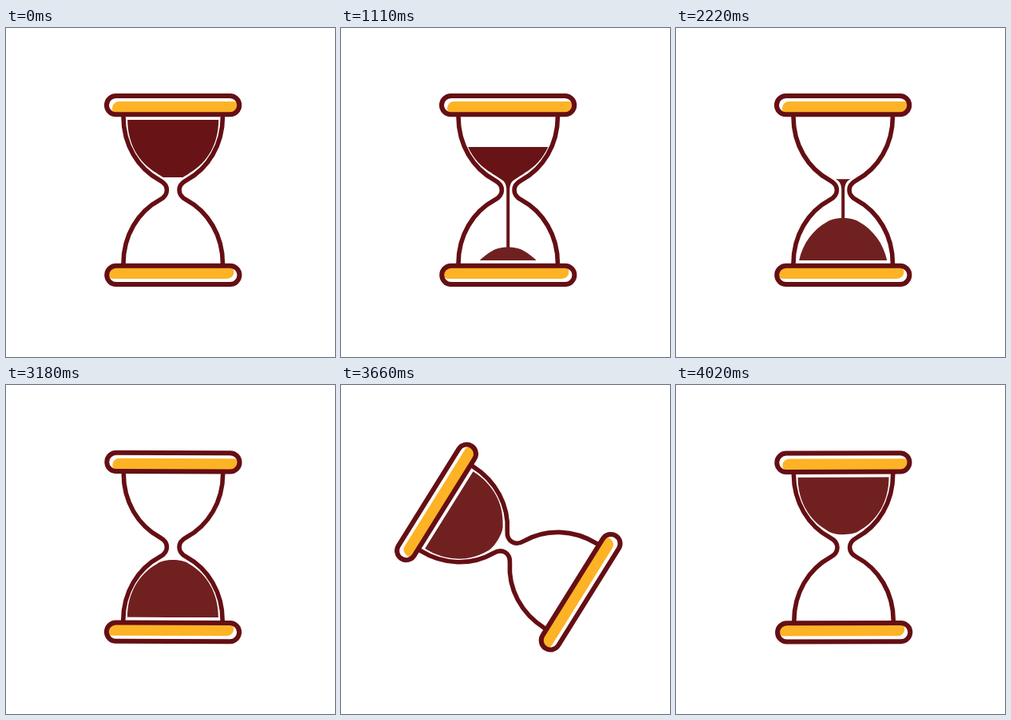
Animation, 412 px wide and 412 px high, one loop 4.05 s. Source, as an HTML page with a canvas:

```html
<!DOCTYPE html>
<html lang="en">
<head>
<meta charset="utf-8">
<title>Hourglass</title>
<style>
  html, body { margin: 0; width: 100%; height: 100%; overflow: hidden; background: #fff; }
  canvas { display: block; width: 100vw; height: 100vh; }
</style>
</head>
<body>
<canvas id="stage"></canvas>
<script>
const SIZE = 412, LOOP = 4050, STEP = 30;
const LINE = '#650f14', SAND = '#681416', HEAP = '#712020', GOLD = '#fdb325';
const MID = 203;                        // vertical centre of the glass
const AXIS = 209.2;                     // all shapes use x relative to this line
const PIVOT = { x: 209.5, y: 203.2 };
const TURN_START = 3150;

const canvas = document.getElementById('stage');
const ctx = canvas.getContext('2d');
const dpr = window.devicePixelRatio || 1;
canvas.width = canvas.height = SIZE * dpr;

const clamp = (v, lo, hi) => Math.min(hi, Math.max(lo, v));
const progress = (t, from, to) => clamp((t - from) / (to - from), 0, 1);

// Symmetric cubic-bezier(a, 0, 1 - a, 1)
function ease(x, a = 0.65) {
  let lo = 0, hi = 1;
  for (let i = 0; i < 30; i++) {
    const u = (lo + hi) / 2, v = 1 - u;
    const bx = 3 * v * v * u * a + 3 * v * u * u * (1 - a) + u * u * u;
    if (bx < x) lo = u; else hi = u;
  }
  const u = (lo + hi) / 2;
  return u * u * (3 - 2 * u);
}

// Draw inside a horizontal band between two heights
function band(top, bottom, draw) {
  if (bottom <= top) return;
  ctx.save();
  ctx.beginPath();
  ctx.rect(-100, top, 200, bottom - top);
  ctx.clip();
  draw();
  ctx.restore();
}

function halfTurn(draw) {
  ctx.save();
  ctx.translate(0, MID);
  ctx.rotate(Math.PI);
  ctx.translate(0, -MID);
  draw();
  ctx.restore();
}

function bar() {
  ctx.save();
  ctx.beginPath();
  ctx.roundRect(-83.2, 85, 166.2, 23.3, 11.65);
  ctx.fillStyle = '#fff';
  ctx.fill();
  ctx.save();
  ctx.clip();
  ctx.beginPath();
  ctx.roundRect(-76.2, 92, 160, 17, 8.5);
  ctx.fillStyle = GOLD;
  ctx.fill();
  ctx.restore();
  ctx.beginPath();
  ctx.roundRect(-83.2, 85, 166.2, 23.3, 11.65);
  ctx.lineWidth = 6;
  ctx.strokeStyle = LINE;
  ctx.stroke();
  ctx.restore();
}

function wall() {
  ctx.beginPath();
  ctx.moveTo(-62.2, 108);
  ctx.lineTo(-62.2, 111);
  ctx.bezierCurveTo(-62.2, 146, -44.2, 176, -16.2, 191);
  ctx.bezierCurveTo(-5, 197, -5, 209, -16.2, 215);
  ctx.bezierCurveTo(-44.2, 230, -62.2, 260, -62.2, 295);
  ctx.lineTo(-62.2, 298);
  ctx.lineWidth = 5.6;
  ctx.strokeStyle = LINE;
  ctx.stroke();
}

function bowl(color) {
  ctx.beginPath();
  ctx.moveTo(-57, 115);
  ctx.lineTo(57, 115);
  ctx.bezierCurveTo(57, 145, 43, 169, 20, 182);
  ctx.bezierCurveTo(12, 188.5, -12, 188.5, -20, 182);
  ctx.bezierCurveTo(-43, 169, -57, 145, -57, 115);
  ctx.fillStyle = color;
  ctx.fill();
}

function funnel() {
  ctx.beginPath();
  ctx.moveTo(-20, 182);
  ctx.bezierCurveTo(-16, 185, -12, 187, -8, 190);
  ctx.quadraticCurveTo(-2.5, 193, -2, 201);
  ctx.lineTo(-2, 291);
  ctx.lineTo(2, 291);
  ctx.lineTo(2, 201);
  ctx.quadraticCurveTo(2.5, 193, 8, 190);
  ctx.bezierCurveTo(12, 187, 16, 185, 20, 182);
  ctx.fillStyle = SAND;
  ctx.fill();
}

function sand(t) {
  const level = 108.8 + 0.0362 * t;
  const head = 187 + 104 * progress(t, 0, 450);
  const tail = Math.max(level, 196 + 30 * progress(t, 2400, 2640));
  band(level, 190, () => bowl(SAND));
  if (t < 2640) band(t < 2400 ? level : tail, head, funnel);

  const drop = Math.max(0, 0.0329 * (2790 - t));
  band(200, 291, () => {
    ctx.translate(0, drop);
    halfTurn(() => bowl(HEAP));
  });
}

function draw(t) {
  ctx.setTransform(canvas.width / SIZE, 0, 0, canvas.height / SIZE, 0, 0);
  ctx.fillStyle = '#fff';
  ctx.fillRect(0, 0, SIZE, SIZE);
  ctx.translate(PIVOT.x, PIVOT.y);
  ctx.rotate(Math.PI * (t > TURN_START ? ease(progress(t, TURN_START, LOOP)) : 0));
  ctx.translate(AXIS - PIVOT.x, -PIVOT.y);
  sand(t);
  wall();
  halfTurn(wall);
  bar();
  halfTurn(bar);
}

const start = performance.now();
function tick() {
  const t = (performance.now() - start) % LOOP;
  draw(Math.floor(t / STEP) * STEP);
  requestAnimationFrame(tick);
}
tick();
</script>
</body>
</html>
```
